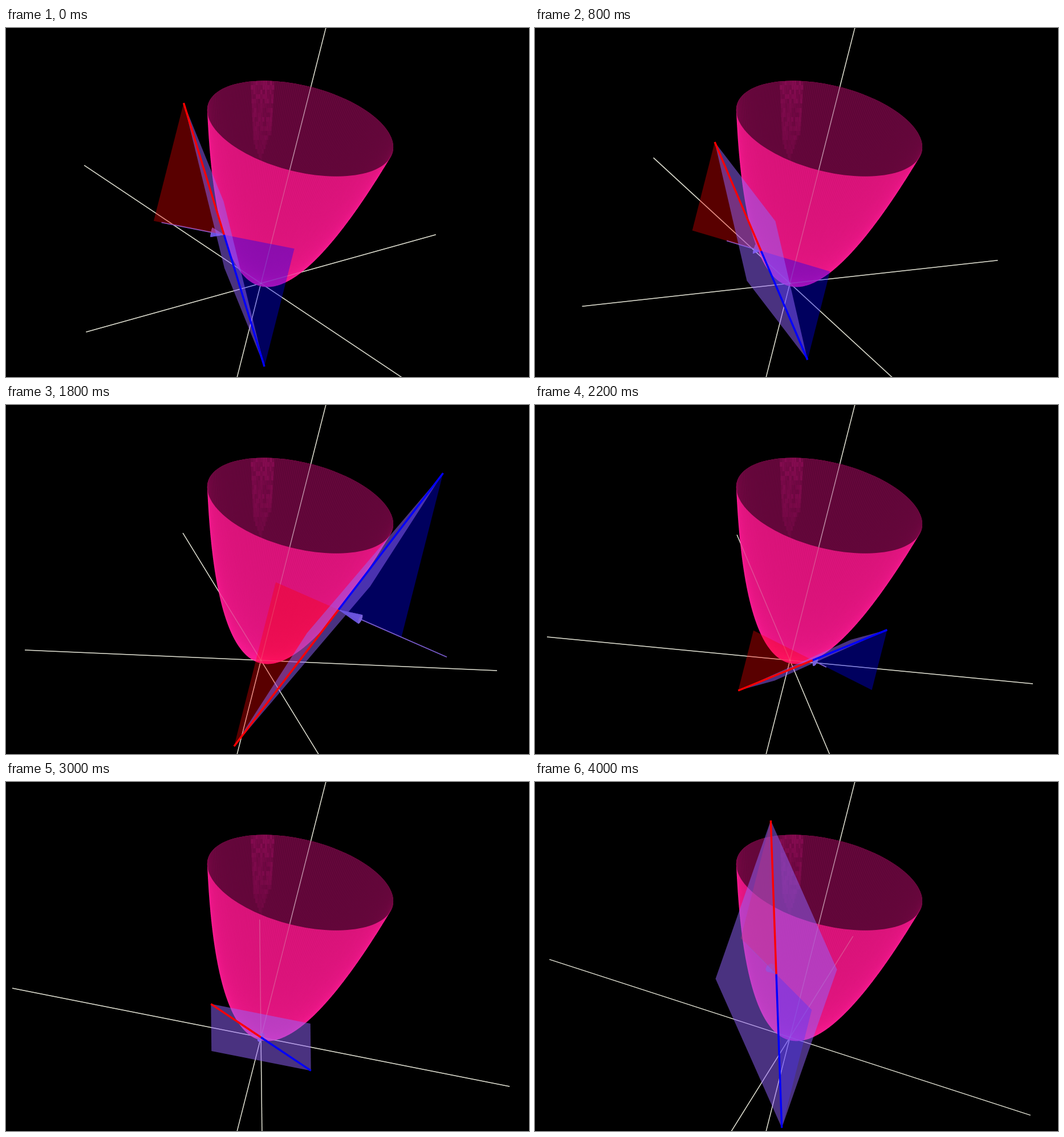
Recreate the animation shown at these times as an HTML page with a canvas. Size 917 px wide and 611 px high, loop 4.2 s.

```html
<!DOCTYPE html>
<html lang="en">
<head>
<meta charset="utf-8">
<title>Directional derivative on a paraboloid</title>
<style>
  html, body { margin: 0; width: 100%; height: 100%; overflow: hidden; background: #000; }
  canvas { display: block; width: 917px; height: 611px; }
</style>
</head>
<body>
<canvas id="stage" width="917" height="611"></canvas>
<script>
const W = 917, H = 611, TAU = Math.PI * 2;
const STEP = 200, STEPS = 21;
const TOP = 3.5, RIM = Math.sqrt(TOP);
const rad = deg => deg * Math.PI / 180;
const ctx = document.getElementById('stage').getContext('2d');

// Orthographic camera; the ground axes turn 3 degrees per step.
function camera(n) {
  const a = rad(45.3 - 3 * n), b = rad(22.4 - 3 * n);
  const p = [-87.2 * Math.cos(a), 44.7 * Math.sin(b)];
  const q = [-87.2 * Math.sin(a), -44.7 * Math.cos(b)];
  return (x, y, z) => [
    447 + x * p[0] + y * q[0] + 19.7 * z,
    447 + x * p[1] + y * q[1] - 77.4 * z
  ];
}

function trace(g, pts) {
  pts.forEach((p, i) => i ? g.lineTo(p[0], p[1]) : g.moveTo(p[0], p[1]));
}

function fill(g, color, pts) {
  g.fillStyle = color;
  g.beginPath();
  trace(g, pts);
  g.closePath();
  g.fill();
}

function line(g, color, width, pts) {
  g.strokeStyle = color;
  g.lineWidth = width;
  g.beginPath();
  trace(g, pts);
  g.stroke();
}

const still = camera(0);

function ring(r) {
  const pts = [];
  for (let i = 0; i < 120; i++) {
    const f = i / 120 * TAU;
    pts.push(still(r * Math.cos(f), r * Math.sin(f), r * r));
  }
  return pts;
}

function meridian(f) {
  const pts = [];
  for (let i = 0; i <= 30; i++) {
    const r = RIM * i / 30;
    pts.push(still(r * Math.cos(f), r * Math.sin(f), r * r));
  }
  return pts;
}

const rim = new Path2D();
trace(rim, ring(RIM));
rim.closePath();

function paintCup() {
  const c = document.createElement('canvas');
  c.width = W;
  c.height = H;
  const g = c.getContext('2d');

  // outer wall
  g.fillStyle = 'rgb(208,17,114)';
  g.beginPath();
  for (let i = 1; i <= 120; i++) {
    trace(g, ring(RIM * i / 120));
    g.closePath();
  }
  g.fill();
  g.save();
  g.globalCompositeOperation = 'source-atop';
  for (let i = 0; i < 300; i++) line(g, 'rgba(255,20,147,.26)', 1.1, meridian(i / 300 * TAU));
  g.restore();

  // open mouth showing the far wall
  g.save();
  g.clip(rim);
  g.fillStyle = 'rgb(92,6,54)';
  g.fillRect(0, 0, W, H);
  for (let i = 0; i < 300; i++) line(g, 'rgba(255,20,147,.11)', 1, meridian(i / 300 * TAU));
  let seed = 7;
  const rnd = () => (seed = seed * 16807 % 2147483647) / 2147483647;
  for (let i = 0; i < 10; i++) {
    const x = 429 + i * 4.2;
    const end = 232 - Math.abs(x - 444) * 2.2;
    for (let y = 92; y < end; y += 8) {
      const lean = (445 - x) * (y - 92) / 350;
      const a = (.08 + .16 * rnd()) * (1 - (y - 92) / 190);
      g.fillStyle = `rgba(255,30,160,${a})`;
      g.fillRect(x + lean, y, 4, 8);
    }
  }
  g.restore();
  return c;
}

const cup = paintCup();

function drawAxes(at) {
  const color = 'rgb(218,218,205)';
  line(ctx, color, 1.5, [at(-5, 0, 0), at(5, 0, 0)]);
  line(ctx, color, 1.5, [at(0, -5, 0), at(0, 5, 0)]);
  line(ctx, color, 1.5, [at(0, 0, -7), at(0, 0, 7)]);
}

// Horizontal arrow whose tip rests on the tangent point.
function drawArrow(at, c, z) {
  const len = Math.sign(c) * z, m = c + len * .2, k = .067;
  const tip = at(c, c, z), base = [];
  for (let i = 0; i < 24; i++) {
    const u = k * Math.cos(i / 24 * TAU), v = k * Math.SQRT2 * Math.sin(i / 24 * TAU);
    base.push(at(m + u, m - u, z + v));
  }
  line(ctx, 'rgb(122,92,206)', 1.8, [tip, at(c + len, c + len, z)]);
  base.forEach((p, i) => fill(ctx, 'rgb(106,84,222)', [tip, p, base[(i + 1) % 24]]));
  fill(ctx, 'rgb(122,98,218)', base);
}

function faded(alpha, draw) {
  ctx.save();
  ctx.globalAlpha = alpha;
  draw();
  ctx.restore();
}

function render(n) {
  const at = camera(n);
  const th = rad(18 * n);
  const c = 2 / 3 * Math.cos(th) + Math.sin(2 * th) / 2;
  const z = 2 * c * c, s = 4 * c;
  const behind = c > 0;
  const arrow = () => drawArrow(at, c, z);

  ctx.fillStyle = '#000';
  ctx.fillRect(0, 0, W, H);
  drawAxes(at);
  if (behind) arrow();
  ctx.drawImage(cup, 0, 0);
  faded(.28, () => drawAxes(at));
  if (behind) faded(.3, arrow);
  faded(.45, () => {
    ctx.clip(rim);
    line(ctx, 'rgb(255,220,240)', 1.5, [at(0, 0, 0), at(0, 0, 7)]);
  });

  const mid = at(c, c, z);
  const red = at(c + 1, c + 1, z + s), blue = at(c - 1, c - 1, z - s);
  fill(ctx, 'rgba(255,0,0,.35)', [mid, at(c + 1, c + 1, z), red]);
  fill(ctx, 'rgba(0,0,255,.37)', [mid, at(c - 1, c - 1, z), blue]);
  fill(ctx, 'rgba(147,100,255,.5)', [red, at(c + 1, c - 1, z), blue, at(c - 1, c + 1, z)]);
  if (!behind) arrow();
  line(ctx, '#f00', 3.4, [mid, red]);
  line(ctx, '#00f', 3.4, [mid, blue]);
}

let shown = -1;
function tick(now) {
  const n = Math.floor(now / STEP) % STEPS;
  if (n !== shown) render(shown = n);
  requestAnimationFrame(tick);
}
const start = performance.now();
render(shown = 0);
requestAnimationFrame(function loop() {
  tick.now = performance.now() - start;
  const n = Math.floor(Math.max(0, tick.now) / STEP) % STEPS;
  if (n !== shown) render(shown = n);
  requestAnimationFrame(loop);
});
</script>
</body>
</html>
```
